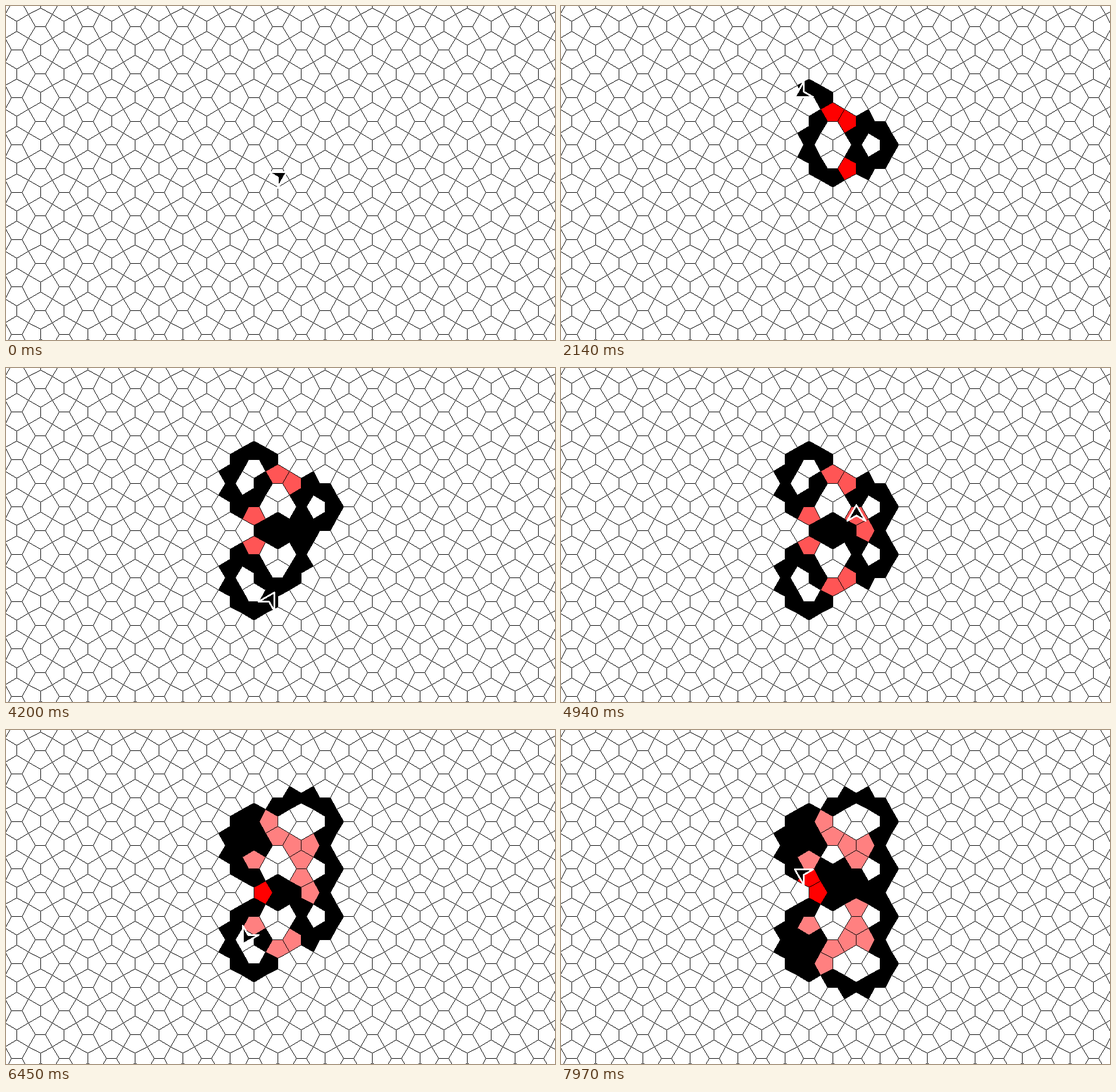
These frames come from a looping animation (942x574 px, 8000 ms). An HTML page with a canvas:

```html
<!DOCTYPE html>
<html lang="en">
<head>
<meta charset="utf-8">
<title>Ant on a pentagonal tiling</title>
<style>
  html, body { margin: 0; width: 100%; height: 100%; overflow: hidden; background: #fff; }
  svg, canvas { position: absolute; left: 0; top: 0; width: 942px; height: 574px; }
  svg { shape-rendering: crispEdges; }
  #ant { fill: #000; stroke: #fff; stroke-width: 3; stroke-linejoin: round; }
</style>
</head>
<body>
<svg id="cells" viewBox="0 0 942 574"></svg>
<canvas id="grid" width="942" height="574"></canvas>
<svg viewBox="0 0 942 574"><path id="ant" d="M18 0L-9 15.6L0 0L-9 -15.6Z"/></svg>
<script>
const LOOP = 8000, START = 330, TICK = 30.36, STEPS = 90;
const EDGE = 23.5;                       // long side of a pentagon
const PITCH = EDGE * Math.sqrt(3);       // distance between short sides
const HALF = PITCH / 2;
const SHORT = HALF - EDGE / 2;           // half of a short side
const RADIUS = PITCH / (1 + Math.sqrt(3)); // inscribed circle
const X0 = 465.65, Y0 = 238.25;

const cells = document.getElementById('cells');
const ctx = document.getElementById('grid').getContext('2d');
const ant = document.getElementById('ant');

// quarter turns clockwise
function rot([x, y], turns) {
  for (let k = 0; k < turns; k++) [x, y] = [-y, x];
  return [x, y];
}

function place(i, j, dir, p) {
  const [x, y] = rot(p, dir);
  return [X0 + i * PITCH + x, Y0 + j * PITCH + y];
}

function snap(i, j, dir, p) {
  return place(i, j, dir, p).map(Math.round);
}

// one hard pixel per step along the longer axis
function pixelLine([x1, y1], [x2, y2]) {
  const n = Math.max(Math.abs(x2 - x1), Math.abs(y2 - y1));
  for (let k = 0; k <= n; k++)
    ctx.fillRect(Math.round(x1 + (x2 - x1) * k / n), Math.round(y1 + (y2 - y1) * k / n), 1, 1);
}

function drawGrid() {
  const left = [-SHORT, 0], right = [SHORT, 0];
  const lines = [
    [left, right],
    [left, [-HALF, HALF]], [left, [-HALF, -HALF]],
    [right, [HALF, HALF]], [right, [HALF, -HALF]]
  ];
  for (let i = -13; i <= 13; i++)
    for (let j = -7; j <= 9; j++) {
      const dir = (i + j) & 1 ? 0 : 1;
      for (const [a, b] of lines) pixelLine(snap(i, j, dir, a), snap(i, j, dir, b));
    }
}

// Sides run clockwise from the short one; a cell points down, left, up or right (0 to 3).
const NEXT = [[2, 0, 0], [1, 1, 0], [3, 0, 1], [1, 0, 1], [3, -1, 0]];
const ENTER = [0, 2, 1, 4, 3];
const PENTAGON = [[-SHORT, 0], [SHORT, 0], [HALF, HALF], [0, PITCH - SHORT], [-HALF, HALF]];

function neighbour(c, side) {
  const [turn, dx, dy] = NEXT[side];
  const [x, y] = rot([dx, dy], c.dir);
  return { i: c.i + x, j: c.j + y, dir: (c.dir + turn) % 4 };
}

const shapes = new Map();
function shapeOf(c) {
  const key = [c.i, c.j, c.dir].join();
  if (!shapes.has(key)) {
    const el = document.createElementNS('http://www.w3.org/2000/svg', 'polygon');
    const points = PENTAGON.map(p => snap(c.i, c.j, c.dir, p).map(v => v + 0.5));
    el.setAttribute('points', points.join(' '));
    cells.append(el);
    shapes.set(key, { el, visits: 0 });
  }
  return shapes.get(key);
}

// Even cells turn the ant left, odd cells turn it right.
function walk() {
  let cell = { i: 0, j: 1, dir: 0 }, exit = 1;
  const path = [{ centre: place(0, 1, 0, [0, RADIUS]) }];
  for (let k = 0; k < STEPS; k++) {
    cell = neighbour(cell, exit);
    const shape = shapeOf(cell);
    exit = (ENTER[exit] + (shape.visits++ % 2 ? 3 : 2)) % 5;
    path.push({ shape, centre: place(cell.i, cell.j, cell.dir, [0, RADIUS]) });
  }
  return path;
}

function colour(n, max) {
  if (n % 2) return '#000';
  const v = Math.round(255 * (1 - n / max));
  return `rgb(255,${v},${v})`;
}

function paint(step) {
  for (const s of shapes.values()) s.visits = 0;
  let max = 1;
  for (let k = 1; k <= step; k++) max = Math.max(max, ++path[k].shape.visits);
  for (const s of shapes.values()) s.el.setAttribute('fill', colour(s.visits, max));
}

drawGrid();
const path = walk();
let shown = -1;

function draw() {
  const t = performance.now() % LOOP;
  const thirds = t < START ? 0 : Math.floor((t - START) / TICK) + 2;
  const step = Math.floor(thirds / 3), part = thirds % 3 / 3;
  if (step !== shown) paint(shown = step);
  const [ax, ay] = path[step].centre, [bx, by] = path[step + 1].centre;
  const x = ax + (bx - ax) * part + 0.5, y = ay + (by - ay) * part + 0.5;
  const angle = Math.atan2(by - ay, bx - ax) * 180 / Math.PI;
  ant.setAttribute('transform', `translate(${x} ${y}) rotate(${angle})`);
  requestAnimationFrame(draw);
}
draw();
</script>
</body>
</html>
```
